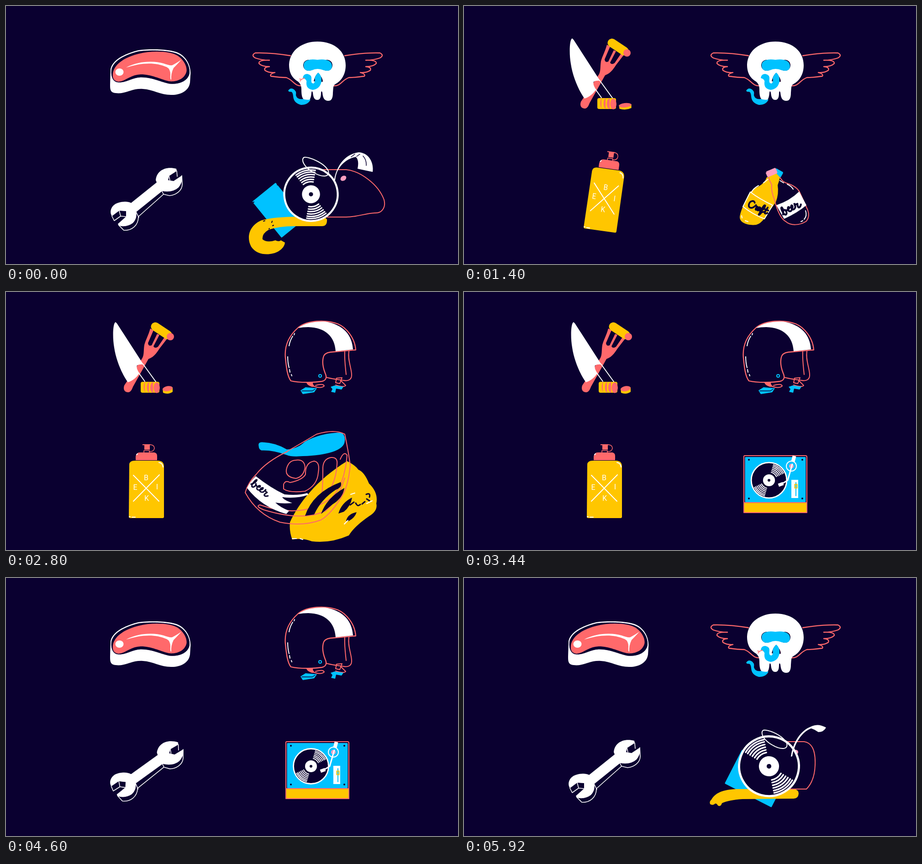
Write an HTML page that moves like this. It is 990x566 px and loops after 5.96 s.

```html
<!DOCTYPE html>
<html lang="en">
<head>
<meta charset="utf-8">
<title>Morphing icons</title>
<style>
html,body{margin:0;width:100%;height:100%;overflow:hidden;background:#0a0030}
svg{display:block;width:100vw;height:100vh}
.w{fill:#fff}.r{fill:#ff696b}.b{fill:#00c2ff}.y{fill:#ffc600}.d{fill:#0a0030}
.lw,.lr,.lb,.ld,.lc,.ly{fill:none;stroke-width:2;stroke-linecap:round;stroke-linejoin:round}
.lw{stroke:#fff}.lr{stroke:#ff696b}.lb{stroke:#00c2ff}.ld{stroke:#0a0030}.lc{stroke:#ffe58a;stroke-width:4}.ly{stroke:#ffc600}
text{font:400 16px Roboto,Inter,sans-serif;fill:#fff;text-anchor:middle}
</style>
</head>
<body>
<svg id="stage" viewBox="0 0 990 566"></svg>
<script>
const LOOP = 5960;
const stage = document.getElementById('stage');
const $ = id => document.getElementById(id);

const rect = (x, y, w, h, deg = 0) => {
  const a = deg * Math.PI / 180, c = Math.cos(a) / 2, s = Math.sin(a) / 2;
  const corners = [[-w, -h], [w, -h], [w, h], [-w, h]].map(([u, v]) =>
    `${(x + u * c - v * s).toFixed(1)} ${(y + u * s + v * c).toFixed(1)}`);
  return `M${corners.join(' L')}Z`;
};
const oval = (x, y, rx, ry, deg = 0) =>
  `M${x - rx} ${y}A${rx} ${ry} ${deg} 0 1 ${x + rx} ${y}A${rx} ${ry} ${deg} 0 1 ${x - rx} ${y}Z`;
const mirror = d => d.replace(/([\d.]+) ([\d.]+)/g, (_, x, y) => `${1365 - x} ${y}`);

const grooves = [0, 180].map(turn => [18, 21.5, 25, 28.5, 32, 35].map(r => {
  const x = r * Math.cos(.42), y = r * Math.sin(.42);
  return `<path class="lw" transform="rotate(${turn - 50})" d="M${x} ${-y}A${r} ${r} 0 0 1 ${x} ${y}"/>`;
}).join('')).join('');

const slices = [0, 1, 2, 3].map(i => `<g class="slice"><rect class="y" x="${295 + i * 9}" y="197" width="14" height="24" rx="4"/>
  <ellipse class="r" cx="${306 + i * 8}" cy="${208.5 + i * .5}" rx="${4.5 + i * .8}" ry="11.5"/></g>`).join('');

const CRAFT = 'M11 -14C8 -20 -1 -14 0 -6C1 2 8 2 12 -3Q15 -7 16 -10Q16 -7 20 -8Q17 0 20 0Q24 -1 28 -8C22 -11 20 -1 24 0Q28 -2 28 -8Q26 0 31 -1Q38 -9 36 -17Q33 -19 32 -9L30 8Q32 9 34 0L40 -3Q43 -10 43 -15Q40 -2 42 0Q45 0 47 -3M36 -9L47 -9';
const BEER = 'M0 -3Q7 -11 5 -18Q2 -19 2 -7Q3 3 8 -1Q11 -6 8 -10Q11 -6 15 -7Q22 -9 18 -12Q14 -10 15 -4Q18 1 23 -4Q29 -9 26 -12Q22 -10 23 -4Q26 1 32 -5L33 -12Q34 -8 39 -9Q35 0 39 0Q42 0 45 -4';

stage.innerHTML = `
<g id="tl">
  <path id="body" class="w" data-show="0 1080 4280 5960"/>
  <path id="top" class="d"/>
  <path id="meat" class="r"/>
  <path id="rim" class="lw" style="stroke-width:1"/>
  <path id="marble" class="w"/>
  <path id="fat" class="w"/>
  <path id="blade" class="w" data-show="1080 4280"/>
  <g data-show="1240 4200">
    <path class="lw" d="M300 158L329 198M291 178L304 196"/>
    <path class="ly" style="stroke-width:19" d="M327 76L354 94"/>
    <circle class="r" cx="360" cy="98" r="8"/>
    ${slices}
    <g id="chip">
      <path class="y" d="M343 212L365 209V219Q355 226 344 221Z"/>
      <ellipse class="r" cx="354" cy="212" rx="11" ry="5.5" transform="rotate(-10 354 212)"/>
    </g>
  </g>
</g>
<g id="tr">
  <path id="wingL" class="lr" style="stroke-width:2.3"/>
  <path id="wingR" class="lr" style="stroke-width:2.3"/>
  <path id="skull" class="w"/>
  <g data-show="0 2200 5320 5960">
    <g id="eyes"><ellipse class="d" cx="663" cy="130" rx="12" ry="12"/><ellipse class="d" cx="703" cy="130" rx="12" ry="12"/></g>
    <path id="goggles" class="b"/>
    <path class="d" d="M683 147Q694 157 694 166Q684 168 674 165Q676 154 683 147Z"/>
    <path id="snake" class="b"/>
    <path id="tail" class="b"/>
    <path id="tongue" class="lr" style="stroke-width:1.5" d="M654 158L647 161L643 160M647 161L644 165"/>
    <circle data-show="1920 2200" class="r" cx="651" cy="145" r="2"/>
  </g>
  <g data-show="2440 4960">
    <path class="lr" d="M742 131C741 150 744 170 745 181M751 130C748 148 756 165 757 180C758 192 750 196 740 194C725 192 710 190 701 187"/>
    <path class="r" d="M658 199L672 199Q672 206 680 208L670 208Q660 205 658 199Z"/>
    <path class="lr" d="M672 206Q690 213 697 206Q695 200 678 205M724 189L736 188L731 201L722 199ZM733 194L744 205Q740 210 722 204"/>
    <path class="b" d="M645 216L656 209L681 211L675 220L650 224Z"/>
    <path class="ld" style="stroke-width:1.3" d="M648 217L671 217L677 213"/>
    <path class="b" d="M711 208L720 205L739 208L735 214L723 212L721 221L712 219L715 213Z"/>
    <path class="lw" d="M632 91L631 94M628 97Q622 106 620 118M617 142Q617 155 620 166M621 170L622 176M625 181L626 184"/>
    <circle class="lb" cx="688" cy="184" r="3"/>
  </g>
  <g data-show="5040 5240">
    <path id="blobL" class="r"/><path id="blobR" class="r"/>
    <path class="b" d="M561 168Q575 168 590 186Q605 195 625 196Q614 203 600 200Q575 193 561 168ZM765 184Q783 170 796 149L805 148Q798 168 765 187Z"/>
    <path class="lr" d="M592 156Q640 147 680 147M690 146L695 146M703 147Q740 149 770 153M558 170Q566 185 579 193M575 168Q590 187 612 193M531 131L533 139M768 138L766 152M817 146L812 158M754 185Q780 175 794 149"/>
    <path class="ld" style="stroke-width:1" d="M770 182Q790 168 800 151"/>
  </g>
</g>
<g id="bl">
  <ellipse class="r" data-show="3800 4400" cx="291" cy="425" rx="6" ry="22"/>
  <path id="edge" class="lw" style="stroke-width:1.6"/>
  <path id="tool"/>
  <path class="lw" style="stroke-width:1.6" data-show="0 600 4400 5960" d="M374 362L375 374M357 373L359 382M341 405L345 413M285 452L291 464L290 462M232 461L237 471L251 461L263 462M248 449L251 461"/>
  <g data-show="1400 3680">
    <path class="r" d="M284 369V361Q285 352 293 352H325Q331 353 331 360V369ZM299 334H316V336H315V346H303V336H299Z"/>
    <path class="lr" style="stroke-width:1.6" d="M302 352V348H314V352M315 335Q325 335 325 343Q324 350 315 350"/>
    <path class="lw" d="M279 402L335 459M336 401L279 459"/>
    <path class="lw" d="M335 374Q343 375 344 384M286 357L288 355M270 493H272M276 494H283"/>
    <text x="307" y="413">B</text><text x="283" y="434">E</text><text x="331" y="433">I</text><text x="308" y="458">K</text>
  </g>
</g>
<path class="lc" data-show="3880 4360" d="M223 427C224 460 238 490 258 499M268 445Q268 457 279 466M368 371C388 382 402 410 401 433M360 417Q366 425 368 435"/>
<g id="br">
  <path id="plate" class="b" stroke="#00c2ff" stroke-width="3" stroke-linejoin="round"/>
  <path id="amber" class="y"/>
  <path id="frame" class="lr"/>
  <path id="pink" fill="#ff9fc1" stroke="#ff9fc1" stroke-width="4" stroke-linejoin="round"/>
  <g data-show="3320 5760">
    <path class="lr" d="M613 462H751"/>
    ${[624, 741].map(x => [368, 453].map(y => `<circle class="d" cx="${x}" cy="${y}" r="2"/>`).join('')).join('')}
    <rect class="w" x="717" y="412" width="15" height="40"/>
    <path class="lb" d="M727 418V447"/>
    <rect id="fader" class="ly" x="724.5" y="428" width="5" height="8"/>
  </g>
  <g id="record" data-show="0 280 3120 5960">
    <circle class="d" r="39"/><circle class="lw" style="stroke-width:2.8" r="38.5"/>
    ${grooves}<circle class="w" r="13"/><circle class="d" r="3"/>
  </g>
  <g data-show="3320 5760">
    <circle class="lw" cx="717" cy="382" r="11"/>
    <path class="lw" style="stroke-width:3" d="M719 378L709 413L696 421"/>
    <path class="w" d="${rect(722, 366, 8, 13, 15)}${rect(694, 422, 11, 7, -20)}"/>
  </g>
  <path id="arm" class="w"/>
  <path id="loop" class="lw"/>
  <path class="ld" style="stroke-width:1.5" data-show="0 40" d="M782 329Q790 338 789 350M756 331L764 325M768 330L775 325"/>
  <path class="ld" data-show="0 40" d="M564 472L567 471M583 472L582 475M586 481L584 482M576 489L577 488M594 392L596 393M543 430L541 431"/>
  <g id="beers" data-show="480 2600">
    <path class="lw" d="M627 408Q648 424 676 437L658 467Q632 457 611 440ZM645 394Q634 400 630 408M656 388L666 380M608 460L609 465M616 471L622 473"/>
    <path class="lw" d="M692 383L700 388M708 391Q717 395 721 402M748 449Q752 460 745 468M742 471L738 473"/>
    <path class="w" d="M684 437Q714 427 734 407L750 437Q730 454 701 467Z"/>
    <path class="ld" style="stroke-width:4" transform="translate(622 440) rotate(22) scale(.95)" d="${CRAFT}"/>
    <path class="ld" style="stroke-width:4" transform="translate(700 460) rotate(-28)" d="${BEER}"/>
  </g>
  <g data-show="2680 2960">
    <path class="lr" d="M634 369Q654 366 655 385Q652 405 635 409Q612 406 614 390Q618 370 634 369ZM608 422Q612 412 622 418Q650 412 656 400Q655 374 675 371Q688 373 684 396Q682 424 655 437Q620 441 608 432ZM694 385Q695 366 712 363Q727 362 725 378Q722 430 690 455Q694 440 694 385ZM732 367Q740 348 747 358Q742 420 715 450Q650 500 556 467Q545 470 565 478Q650 504 700 480Q725 460 742 408"/>
    <path class="w" d="M547 404Q580 430 610 444Q640 447 660 441L662 445Q635 454 605 450Q608 456 627 463Q605 465 590 462Q600 472 620 480L614 487Q560 472 528 430Q535 415 547 404Z"/>
    <path class="ld" style="stroke-width:3" transform="translate(535 424) rotate(36)" d="${BEER}"/>
    <path class="d" d="M655 491Q672 440 733 417Q738 428 722 434Q690 455 675 488ZM690 487Q702 452 741 430Q738 452 715 466ZM728 486Q735 462 758 451Q755 470 740 482ZM745 502Q748 487 768 483Q764 496 749 503Z"/>
    <path class="ld" style="stroke-width:3" d="M754 467L762 461M766 463Q770 472 776 466M780 465L786 460M789 444Q799 440 796 450M790 454L796 458"/>
    <path class="lw" d="M755 444L764 441M741 509L749 501M790 464L802 458M627 541L636 541M644 541L650 543"/>
  </g>
</g>`;

const steak = {
  body: 'M229 138C234 117 262 104 290 97C320 93 362 95 378 103C398 113 406 135 404 152L403 168C400 188 380 195 364 195C340 196 322 183 300 182C275 180 262 194 240 191C228 190 228 182 228 172Z',
  face: 'M230.500 139C235 119 262 106 290 99C320 95 361 97 377 105C396 114 405 135 402 150C396 168 375 173 357 171C335 166 320 157 295 157C275 158 262 170 245 168C231 166 229 150 230.500 139Z',
  red: 'M234 148C237 126 262 112 290 105C320 97 360 99 376 109C390 118 398 135 395 145C390 162 370 167 357 165C335 160 320 150 295 150C272 151 262 165 247 166C236 165 233 158 234 148Z',
  marble: 'M263 135C290 120 325 120 345 126Q358 131 364 130Q372 126 384 118Q374 129 367 136Q361 148 362 162Q359 162 360 150Q360 138 352 134C325 122 295 125 263 135Z',
  fat: oval(248.5, 145, 9, 8)
};
const warped = {
  body: 'M235 142C237 108 290 92 330 94C377 97 404 125 405 155C404 175 395 205 380 209C350 213 335 190 320 182C300 172 270 187 245 187C236 186 235 180 235 170Z',
  face: 'M236.500 142C239 110 290 93 330 95C376 98 402 125 404 155C400 172 388 182 370 182C345 182 330 168 318 162C295 152 270 168 252 160C240 156 236 150 236.500 142Z',
  red: 'M296 122C296 110 325 108 350 112C390 122 405 112 425 105C450 98 470 108 473 125C473 150 450 174 415 176C385 178 365 170 340 155C320 145 297 135 296 122Z',
  marble: 'M274 129C300 118 335 122 355 130Q363 135 369 135Q377 135 387 131Q376 138 368 144Q357 152 352 163Q352 158 362 146Q362 140 352 135C325 122 295 123 274 129Z',
  fat: oval(256.5, 139, 10.5, 9)
};
const blade = 'M240 66C234 68 233 100 237 122C241 150 255 182 267 198C277 195 287 187 292 178C288 172 285 166 287 161Q292 158 301 159L243 69Z';
const fork = 'M316 80C312 95 306 105 303 116C301 128 303 138 298 146L259 205C256 214 260 220 268 220C274 219 276 213 278 208L312 147C326 142 332 130 337 123L354 101L348 98L333 120Q326 125 323 119L336 94L331 92L319 117Q312 120 311 112L323 84Z';
const bladeKeys = [[0, steak.body], [640, steak.body], [960, warped.body], [1200, blade], [4160, blade], [4440, steak.body], [LOOP, steak.body]];
const steakOnly = part => [[0, steak[part]], [640, steak[part]], [960, warped[part]], [1080, null], [4400, steak[part]], [LOOP, steak[part]]];

const skull = 'M682 78C720 78 744 100 744 130C744 152 733 165 722 171C716 174 717 180 716 190C716 204 712 208 706 208C696 208 694 200 693 190Q691 184 690 190C690 200 688 206 682 206C674 206 673 198 672 190Q670 184 669 190C668 204 664 210 658 208C648 206 647 195 647 182Q647 172 640 166C625 157 620 145 620 128C622 96 650 78 682 78Z';
const skullUp = 'M690 62C728 60 750 88 749 118C747 146 735 155 722 166Q712 174 713 186C713 197 709 202 703 202C696 202 694 196 693 188Q691 184 690 190C690 198 688 203 682 203C674 203 673 196 672 188Q670 184 669 188C668 194 664 198 658 196C650 192 652 182 647 172Q643 160 638 150C630 138 630 118 630 100C634 76 660 63 690 62Z';
const stripe = 'M700 65C740 72 758 95 760 126L722 130C720 98 700 78 662 77Q650 77 640 79C655 67 680 64 700 65Z';
const horseshoe = 'M742 91C757 92 760 112 760 128C758 168 735 195 690 195C645 194 618 165 619 115C618 96 632 88 648 97C664 95 674 101 667 109C655 112 648 145 675 154C705 160 738 148 735 118C729 106 728 93 742 91Z';
const wing = 'M623 109Q580 102 546 103Q536 108 546 114Q560 119 577 119Q553 118 554 126Q560 133 577 133Q564 134 567 141Q575 147 589 146Q577 149 580 154Q600 157 614 157C630 163 632 176 647 175';
const wingUp = 'M635 88Q580 92 550 117Q552 124 567 120Q558 127 564 134Q572 132 577 127Q570 140 578 143Q588 144 594 140Q586 150 592 155Q605 159 616 157C628 164 635 170 646 171';
const wingUpR = 'M745 91Q790 92 812 108Q818 114 808 118Q800 119 798 118Q810 128 802 131Q795 133 785 129Q795 139 786 144Q778 145 768 139Q778 148 770 155Q755 156 747 155C738 162 730 170 720 173';
const shell = 'M766 127C764 100 745 78 727 70C700 60 660 62 640 78C615 100 610 125 612 145C614 165 616 185 624 195C645 200 680 198 692 196C702 194 703 186 699 178C695 168 692 155 695 143Q697 134 710 132Z';
const goggles = 'M652 130C652 118 668 116 682 118C700 115 714 120 714 131C714 143 705 143 696 141Q682 135 670 141C658 144 652 140 652 130Z';
const gogglesUp = 'M664 124C662 112 675 108 690 108C708 110 716 118 715 127C710 134 700 131 692 127Q682 124 672 128C666 128 664 126 664 124Z';
const snake = 'M650 158Q651 149 660 149Q670 151 669 160Q667 170 674 170Q678 166 676 158Q679 150 684 146Q692 153 691 165Q688 182 672 184Q657 182 658 168Q660 161 650 158Z';
const snakeUp = 'M645 147Q643 139 652 138Q661 139 663 148Q664 163 671 164Q674 150 686 141Q694 148 690 158Q684 178 672 179Q658 178 656 166Q654 153 645 147Z';
const tail = 'M618 186Q622 179 629 182Q637 186 635 196Q638 206 650 204Q660 207 667 205Q662 217 646 217Q630 213 629 198Q628 188 624 188Q620 189 618 186Z';
const tailUp = 'M625 183Q630 182 634 185Q638 189 638 194Q642 200 650 194Q660 196 669 194Q667 214 649 216Q633 215 629 203Q629 193 628 188Q626 186 625 183Z';
const blobL = 'M535 118Q543 100 561 114Q570 107 585 110C595 115 594 130 594 150Q587 158 578 145Q570 155 577 170Q568 176 556 166C540 150 533 135 535 118Z';
const blobR = 'M777 130Q780 104 797 109Q802 95 818 96C827 100 825 125 815 140Q807 152 799 148Q795 135 788 152Q774 158 774 145Z';

const wrench = 'M328 382C330 362 348 351 373 357L374 362L357 373L355 382L367 384L385 372Q388 386 378 398Q365 410 342 406L285 452Q288 465 278 476Q265 486 247 482L245 478L263 462L263 450L248 449L232 461C226 452 230 440 240 434C253 428 266 428 274 432L330 387Z';
const longTool = 'M362 370C375 350 395 325 420 306Q435 292 447 290L449 293Q425 312 418 323Q440 312 459 297C452 330 430 345 405 355C376 364 346 391 325 410C285 443 254 470 238 495C220 522 190 538 170 542L166 540Q185 520 208 500Q180 507 161 537C170 510 200 480 240 468C292 428 335 395 362 370Z';
const flask = 'M270 378Q271 370 282 370L334 370Q346 371 346 383L346 493Q346 496 343 496L272 496Q269 496 269 493Z';
const bone = 'M287 372C286 353 300 345 312 353Q318 362 324 356Q335 348 345 354C352 362 350 385 343 400C335 420 330 435 332 452C336 475 335 500 328 510C315 518 305 512 295 507Q280 510 270 503C264 490 272 475 281 467C292 455 297 440 294 420C290 400 287 390 287 372Z';
const edge = 'M385 372L386 391C386 405 372 415 358 416L345 413L290 462C290 482 275 493 258 492L247 481';
const longEdge = 'M461 299C455 337 430 354 408 362C380 374 348 404 326 426C286 456 258 484 246 502C222 528 195 542 170 546L162 541';

const bar = 'M751 463L751 484L613 484L613 463Z';
const slug = 'M733 473Q732 484 722 484L610 485Q580 487 565 494Q562 503 556 499Q553 494 550 495Q545 500 539 496Q537 490 542 486C552 468 575 462 610 463L722 463Q733 464 733 473Z';
const hook = 'M703 468Q704 483 692 483L640 483Q600 482 575 491Q560 500 562 512Q572 520 590 514Q598 518 602 514L611 519Q610 530 597 538C580 548 550 548 537 528C525 505 535 480 560 470C590 462 620 463 650 462L698 463Z';
const ale = 'M684 367L692 376Q690 385 687 393Q690 412 683 430L658 466Q649 478 640 480C622 482 603 476 604 462Q606 448 620 420Q626 404 645 396Q659 388 663 376Z';
const splash = 'M811 464Q815 480 795 492Q762 515 751 534Q710 552 670 547Q650 539 627 543Q620 525 622 505C640 465 680 412 747 371Q765 380 772 390Q785 395 795 420Q816 440 811 464Z';
const box = 'M614 359L748 359Q751 359 751 362L751 484L613 484L613 360';
const bulge = 'M700 359L745 359C765 362 770 385 769 410Q768 445 750 463L710 463';
const bulgeBig = 'M695 359L745 359C775 362 815 390 828 425C832 440 825 455 808 454C785 455 770 463 745 463L700 463';
const stout = 'M692 376Q697 385 705 388Q728 395 735 408L753 448Q758 462 750 472C735 482 715 482 705 473Q690 465 680 425Q672 405 674 392Q670 385 666 374';
const mitt = 'M615 350Q650 330 680 312Q720 300 742 312Q750 350 754 380Q750 420 740 440Q715 485 690 500Q650 515 600 505Q550 488 524 440Q530 418 548 400Q570 372 616 350';
const paddle = 'M555 338Q553 330 562 331Q590 332 615 347Q640 345 655 330Q690 310 735 310Q743 318 740 330C735 350 690 358 640 359Q625 360 615 356Q585 345 560 346Q555 344 555 338Z';
const deck = rect(682, 411.5, 130, 96), blueCap = rect(690, 366.5, 15, 10, 30), blueCap2 = rect(685, 365, 19, 10, 28);
const pinkCap = rect(672, 366, 20, 9, -25), pinkCap2 = rect(676, 364, 20, 9, -20);
const dot = oval(717, 382, 3, 3), dotBig = oval(739, 378, 4, 2.5, -35);
const armSmall = 'M716 392C720 360 738 334 760 326Q775 318 793 328Q788 338 776 338Q768 332 760 330C740 338 724 362 719 391Z';
const armBig = 'M718 384C724 350 742 325 772 321C796 322 806 345 803 364L770 357Q774 338 766 331C745 335 724 352 721 382Z';
const loopBig = 'M653 332C645 336 652 354 675 366C692 376 710 376 706 362C698 344 662 330 653 332Z';

// Each key: time, outline (null hides), optional fill
const morphs = {
  body: bladeKeys, blade: bladeKeys,
  top: steakOnly('face'), rim: steakOnly('face'), marble: steakOnly('marble'), fat: steakOnly('fat'),
  meat: [[0, steak.red], [640, steak.red], [960, warped.red], [1240, fork], [4160, fork], [4440, steak.red], [LOOP, steak.red]],
  skull: [[0, skull], [1840, skull], [2000, skullUp], [2160, skullUp], [2440, stripe], [4920, stripe], [5120, horseshoe], [5320, skull], [LOOP, skull]],
  wingL: [[0, wing], [1840, wing], [2000, wingUp], [2160, wingUp], [2440, shell], [4920, shell], [5120, 'M560 112Q600 107 687 110'], [5320, wing], [LOOP, wing]],
  wingR: [[0, mirror(wing)], [1840, mirror(wing)], [2000, wingUpR], [2160, wingUpR], [2440, null], [5120, 'M803 106Q740 108 694 109'], [5320, mirror(wing)], [LOOP, mirror(wing)]],
  goggles: [[0, goggles], [1840, goggles], [2000, gogglesUp], [2240, gogglesUp], [5240, goggles], [LOOP, goggles]],
  snake: [[0, snake], [1840, snake], [2000, snakeUp], [2240, snakeUp], [5240, snake], [LOOP, snake]],
  tail: [[0, tail], [1840, tail], [2000, tailUp], [2240, tailUp], [5240, tail], [LOOP, tail]],
  blobL: [[5000, rect(600, 130, 20, 30)], [5120, blobL], [5240, wing]],
  blobR: [[5000, rect(765, 130, 20, 30)], [5120, blobR], [5240, mirror(wing)]],
  tool: [[0, wrench, '#ffffff'], [600, wrench, '#ffffff'], [960, longTool, '#ffffff'], [1160, longTool, '#ffffff'], [1400, flask, '#ffc600'], [3660, flask, '#ffc600'], [3820, bone, '#ffe58a'], [4400, bone, '#ffe58a'], [4400, wrench, '#ffffff'], [LOOP, wrench, '#ffffff']],
  edge: [[0, edge], [600, edge], [960, longEdge], [1160, null], [4400, edge], [LOOP, edge]],
  plate: [[0, rect(597, 448, 99, 63, 51)], [440, blueCap], [960, blueCap], [2000, blueCap2], [2520, blueCap2], [2800, paddle], [2880, paddle], [3280, deck], [5700, deck], [5920, rect(641, 440, 112, 80, 27)], [LOOP, rect(597, 448, 99, 63, 51)]],
  amber: [[0, hook], [520, ale], [2520, ale], [2800, splash], [2880, splash], [3280, bar], [5720, bar], [5920, slug], [LOOP, hook]],
  frame: [[0, bulgeBig], [480, stout], [2520, stout], [2800, mitt], [2880, mitt], [3280, box], [5720, box], [5920, bulge], [LOOP, bulgeBig]],
  pink: [[0, dotBig], [440, pinkCap], [960, pinkCap], [2000, pinkCap2], [2640, null], [3320, dot], [5720, dot], [5920, oval(727, 382, 3, 3)], [LOOP, dotBig]],
  arm: [[0, armBig], [240, null], [5760, armSmall], [5920, armSmall], [LOOP, armBig]],
  loop: [[0, loopBig], [240, null], [5760, 'M679 350C672 366 690 384 714 381C720 364 700 342 679 350Z'], [LOOP, loopBig]]
};

const ease = k => k * k * (3 - 2 * k);
const mix = (a, b, k) => a + (b - a) * k;

function segment(keys, t) {
  let i = keys.length - 1;
  while (i > 0 && keys[i][0] > t) i--;
  const a = keys[i], b = keys[i + 1] || a;
  return [a, b, a === b || t <= a[0] ? 0 : ease((t - a[0]) / (b[0] - a[0]))];
}

const ruler = document.createElementNS('http://www.w3.org/2000/svg', 'path');
const cache = {};
const sample = d => {
  if (cache[d]) return cache[d];
  ruler.setAttribute('d', d);
  const n = 110, length = ruler.getTotalLength();
  return cache[d] = Array.from({length: n + 1}, (_, i) => ruler.getPointAtLength(length * i / n));
};
const blend = (from, to, k) => {
  const a = sample(from), b = sample(to);
  return 'M' + a.map((p, i) => `${mix(p.x, b[i].x, k).toFixed(1)} ${mix(p.y, b[i].y, k).toFixed(1)}`).join('L');
};
const blendColor = (a, b, k) => `rgb(${[1, 3, 5].map(i =>
  Math.round(mix(parseInt(a.substr(i, 2), 16), parseInt(b.substr(i, 2), 16), k)))})`;

function drawMorph(id, t) {
  const el = $(id), [a, b, k] = segment(morphs[id], t);
  el.setAttribute('d', !a[1] ? '' : k === 0 || !b[1] || a[1] === b[1] ? a[1] : blend(a[1], b[1], k));
  if (a[2]) el.setAttribute('fill', blendColor(a[2], b[2], k));
}

// Each key: time, dx, dy, rotation, x scale, y scale
const moves = {
  tl: [308, 150, [[0], [1000], [1200, 0, -52], [1400, -3, 5], [1560, -2, -2], [2000, -2, -2], [2400]]],
  chip: [354, 217, [[0], [1560, 2, 0, 0, 1.25, .85], [2000, 2, 0, 0, 1.25, .85], [2400]]],
  tr: [683, 200, [[0], [2000], [2200, 0, -30], [2440, 0, -18], [2600, 0, 4], [2720], [5120], [5400, 0, -62], [5540, 0, 7], [5680]]],
  eyes: [683, 130, [[0], [1840], [2000, 7, -9, 0, .8, .65], [2240, 7, -9, 0, .8, .65], [5240]]],
  bl: [308, 430, [[0], [1200], [1400, 0, -8, 8, .94, 1.08], [1520, 0, 0, -4, 1.04, .97], [1680, 0, 0, 1], [2000, 0, 0, 1], [2400], [3660], [3740, 0, 0, -170], [4080], [4400, 0, 0, 53], [4400, 0, 0, -18], [4520, 0, 0, 6], [4680]]],
  beers: [680, 430, [[0], [480, 0, 0, -10, .5, .5], [640, 0, 0, 3, 1.05, 1.05], [760], [2560]]],
  record: [668, 413, [[0, 0, 0, 126, 1.52, 1.52], [280, 0, 0, 260, .2, .2], [3120, 0, 0, -130, .2, .2], [3320, 0, 0, 0, 1.06, 1.06], [3480], [5720], [5920, 0, 0, 105, 1.7, 1.7], [LOOP, 0, 0, 126, 1.52, 1.52]]]
};

function place(id, t) {
  const [cx, cy, keys] = moves[id], [a, b, k] = segment(keys, t);
  const v = [0, 0, 0, 1, 1].map((rest, i) => mix(a[i + 1] ?? rest, b[i + 1] ?? rest, k));
  const back = id === 'record' ? '' : `translate(${-cx} ${-cy})`;
  $(id).setAttribute('transform', `translate(${cx + v[0]} ${cy + v[1]}) rotate(${v[2]}) scale(${v[3]} ${v[4]}) ${back}`);
}

const timed = [...document.querySelectorAll('[data-show]')].map(el => [el, el.dataset.show.split(' ').map(Number)]);
const sliceEls = [...document.querySelectorAll('.slice')];

function render(t) {
  for (const [el, spans] of timed) {
    const on = spans.some((from, i) => i % 2 === 0 && t >= from && t < spans[i + 1]);
    el.style.display = on ? '' : 'none';
  }
  for (const id in morphs) drawMorph(id, t);
  for (const id in moves) place(id, t);
  const stretch = ease(Math.min(1, Math.max(0, (t - 3920) / 160)));
  sliceEls.forEach((el, i) => el.setAttribute('transform', `translate(${stretch * (3 - i)} 221) scale(1 ${1 + stretch * (3 - i) * .14}) translate(0 -221)`));
  $('tongue').style.display = t < 300 || t > 5700 ? '' : 'none';
  $('fader').setAttribute('y', 423.5 + 4.5 * Math.cos((t - 4080) / 1040 * Math.PI));
}

const start = performance.now();
function tick() {
  render(Math.floor(((performance.now() - start) % LOOP) / 40) * 40);
  requestAnimationFrame(tick);
}
tick();
</script>
</body>
</html>
```
